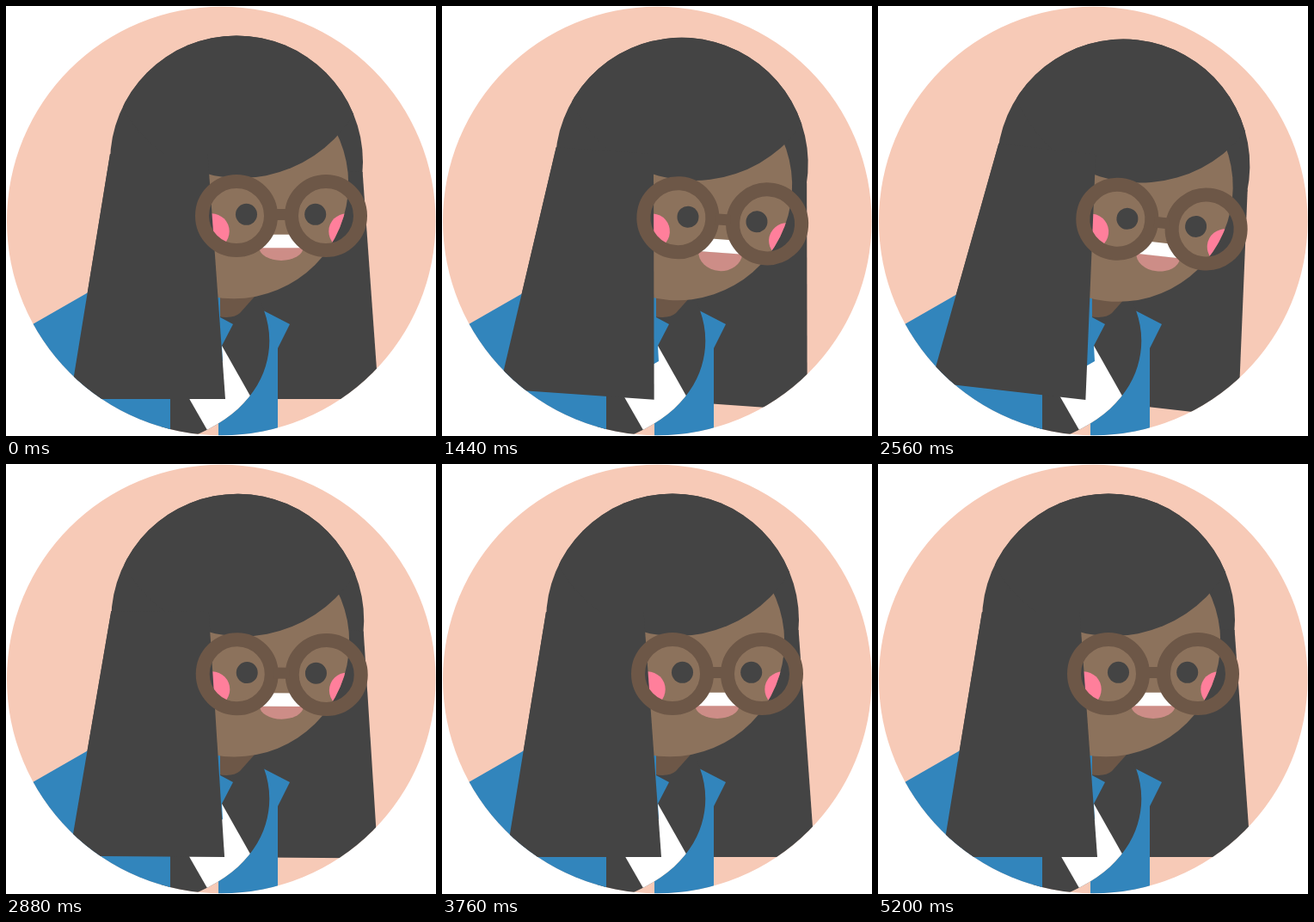
An HTML page with a canvas that plays this animation: 500 px wide and 500 px high, repeating every 5.76 s.

```html
<!DOCTYPE html>
<html lang="en">
<head>
<meta charset="utf-8">
<title>Portrait</title>
<style>
  html, body { margin: 0; width: 100%; height: 100%; overflow: hidden; background: #fff; }
  canvas { display: block; width: 100vmin; height: 100vmin; }
</style>
</head>
<body>
<canvas></canvas>
<script>
const LOOP = 5760, STEP = 80, TAU = Math.PI * 2;
const SKIN = '#8c725c', BROWN = '#6d5747', DARK = '#444444', BLUE = '#3285bc',
      BACK = '#f7cab7', CHEEK = '#ff7f9b', LIP = '#cd8d87', WHITE = '#ffffff';
const PIVOT = { x: 240, y: 337 };
const LENS = { mid: 320, y: 244, gap: 52, r: 40 };

const canvas = document.querySelector('canvas');
const ctx = canvas.getContext('2d');

// Progress from 0 to 1 between two times
const sine = p => (1 - Math.cos(Math.PI * p)) / 2;
const cubic = p => p < 0.5 ? 4 * p ** 3 : 1 - 4 * (1 - p) ** 3;
const ramp = (t, from, to, ease = sine) =>
  ease(Math.min(1, Math.max(0, (t - from) / (to - from))));
const hold = (t, from, to, fade) => ramp(t, from, from + fade) - ramp(t, to - fade, to);

// Lean in, swing back past upright, settle; then a smaller nod
const tilt = t =>
  7 * ramp(t, 1000, 1840, cubic) - 8.9 * ramp(t, 2460, 3100) + 1.9 * ramp(t, 3100, 3340) +
  3.8 * (ramp(t, 4370, 4880) - ramp(t, 4880, 5200));
const blink = t => hold(t, 0, 320, 160) + hold(t, 3440, 3760, 160);
const wink = t => hold(t, 4400, 5200, 160);
const smile = t => hold(t, 1040, 2800, 560);

function fill(color, path) {
  ctx.beginPath();
  path();
  ctx.fillStyle = color;
  ctx.fill();
}

function clipped(path, draw) {
  ctx.save();
  ctx.beginPath();
  path();
  ctx.clip();
  draw();
  ctx.restore();
}

const circle = (x, y, r) => () => ctx.arc(x, y, r, 0, TAU);
const box = (x, y, w, h) => () => ctx.rect(x, y, w, h);
const poly = (...points) => () => points.forEach(([x, y]) => ctx.lineTo(x, y));
const pair = draw => [-1, 1].forEach(draw);

function tilted(angle, draw) {
  ctx.save();
  ctx.translate(PIVOT.x, PIVOT.y);
  ctx.rotate(angle);
  ctx.translate(-PIVOT.x, -PIVOT.y);
  draw();
  ctx.restore();
}

const crown = circle(268, 181.4, 147);

function backHair() {
  fill(DARK, crown);
  fill(DARK, poly([121, 172], [414.6, 193], [433.5, 457], [74.6, 457]));
}

function shirt() {
  ctx.moveTo(300, 354);
  ctx.bezierCurveTo(317, 400, 302, 463, 225, 497);
  ctx.lineTo(180, 520);
  ctx.lineTo(180, 300);
  ctx.lineTo(280, 300);
}

function neck() {
  ctx.moveTo(247, 300);
  ctx.lineTo(305, 320);
  ctx.lineTo(272, 357);
  ctx.quadraticCurveTo(264, 364, 247, 361);
}

function body() {
  fill(BLUE, poly([247, 500], [247, 400], [299, 354], [330, 370], [316, 398], [316, 500]));
  fill(DARK, shirt);
  clipped(shirt, () => fill(WHITE, poly([251, 395], [303, 487], [250, 521], [211, 453])));
  fill(BROWN, neck);
  fill(BLUE, poly([0, 387.7], [249, 245], [249, 362], [264, 370], [251, 395],
    [252, 413], [191, 448], [191, 500], [0, 500]));
}

function eye(x, closed) {
  const w = 25, h = w - 17 * closed;
  fill(DARK, () => ctx.roundRect(x - w / 2, 242.3 - h / 2, w, h, h / 2));
}

function mouth(open) {
  fill(LIP, () => ctx.ellipse(LENS.mid, 281, 25.5, 15 + 8 * open, 0, 0, Math.PI));
  fill(WHITE, box(LENS.mid - 26, 265.7, 52, 15.5));
}

function glasses() {
  ctx.strokeStyle = BROWN;
  ctx.lineWidth = 16;
  pair(side => {
    ctx.beginPath();
    ctx.arc(LENS.mid + side * LENS.gap, LENS.y, LENS.r, 0, TAU);
    ctx.stroke();
  });
  fill(BROWN, box(LENS.mid - 9, 236, 18, 13));
}

function head(t) {
  const closed = blink(t);
  clipped(circle(264.8, 206.8, 133.4), () => {
    fill(SKIN, box(200, 60, 200, 290));
    pair(side => fill(CHEEK, circle(317.5 + side * 78.5, 262, 20.7)));
  });
  clipped(crown, () => fill(DARK, circle(272.3, 45.5, 154.6)));
  fill(DARK, poly([121, 172], [234.5, 172], [255, 457], [74.6, 457]));
  eye(279.5, closed);
  eye(359.7, closed + wink(t));
  mouth(smile(t));
  glasses();
}

function render(t) {
  const scale = canvas.width / 500;
  const angle = tilt(t) * Math.PI / 180;
  ctx.setTransform(scale, 0, 0, scale, 0, 0);
  fill(WHITE, box(0, 0, 500, 500));
  clipped(circle(250.3, 250, 249.3), () => {
    fill(BACK, box(0, 0, 500, 500));
    tilted(angle, backHair);
    body();
    tilted(angle, () => head(t));
  });
}

function resize() {
  const side = Math.min(innerWidth, innerHeight) || 500;
  canvas.width = canvas.height = Math.round(side * (devicePixelRatio || 1));
}

const start = performance.now();
function tick() {
  const t = (performance.now() - start) % LOOP;
  render(Math.floor(t / STEP) * STEP);
  requestAnimationFrame(tick);
}

addEventListener('resize', resize);
resize();
tick();
</script>
</body>
</html>
```
